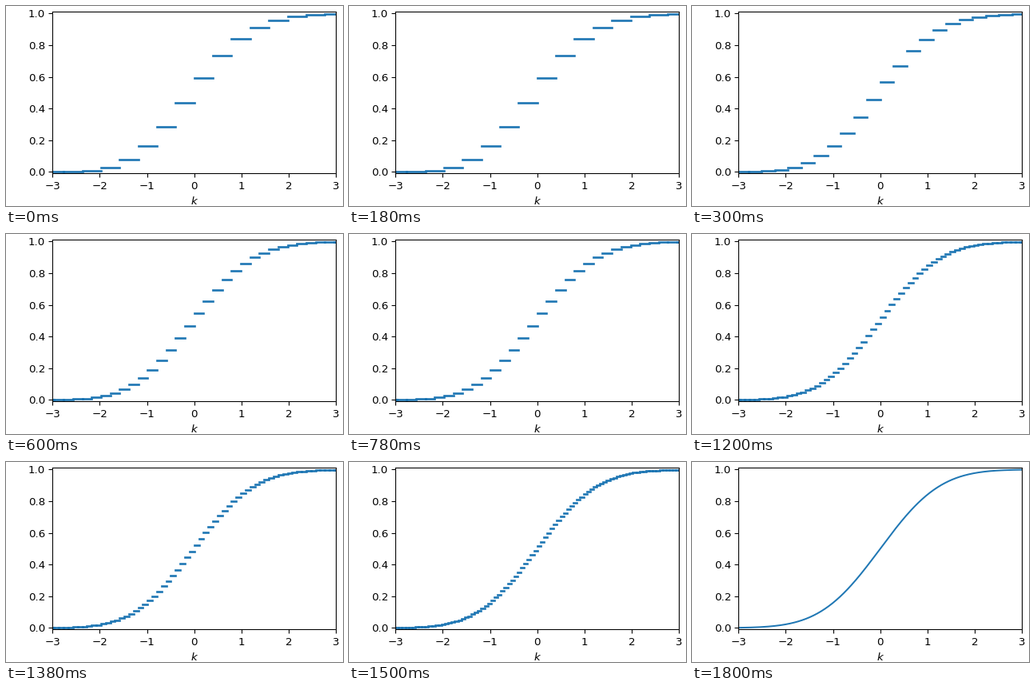
Recreate the animation shown at these times as a matplotlib script. Size 422 by 250 pixels, loop 2100 ms.

```python
import math

import numpy as np
import matplotlib.pyplot as plt
from matplotlib.animation import FuncAnimation

W, H, DPI = 422, 250, 96
LEFT, RIGHT, TOP, BOTTOM = 58.4, 413, 7.4, 209.4
P = 0.2
SIZES = [40 * 2 ** i for i in range(6)]

plt.rcParams.update({"font.family": "DejaVu Sans", "font.size": 10})


def binomial_steps(n):
    """Standardised binomial CDF as separate horizontal pieces."""
    k = np.arange(n + 1)
    log_pmf = [math.lgamma(n + 1) - math.lgamma(i + 1) - math.lgamma(n - i + 1)
               + i * math.log(P) + (n - i) * math.log(1 - P) for i in k]
    cdf = np.cumsum(np.exp(log_pmf))
    sd = math.sqrt(n * P * (1 - P))
    z = (k - n * P) / sd
    keep = np.abs(z) < 3.6
    z, cdf = z[keep], cdf[keep]
    gap = np.full_like(z, np.nan)
    x = np.column_stack([z, z + 1 / sd, gap]).ravel()
    y = np.column_stack([cdf, cdf, gap]).ravel()
    return x, y


def normal_curve():
    x = np.linspace(-3, 3, 300)
    return x, np.array([(1 + math.erf(v / math.sqrt(2))) / 2 for v in x])


fig = plt.figure(figsize=(W / DPI, H / DPI), dpi=DPI, facecolor="white")
ax = fig.add_axes([LEFT / W, 1 - BOTTOM / H, (RIGHT - LEFT) / W, (BOTTOM - TOP) / H])
ax.set(xlim=(-3, 3), ylim=(-0.01, 1.01), xlabel="$k$", xticks=range(-3, 4))
line, = ax.plot([], [], color="C0")


def draw(i):
    if i < len(SIZES):
        line.set_data(*binomial_steps(SIZES[i]))
        line.set_linewidth(2)
    else:
        line.set_data(*normal_curve())
        line.set_linewidth(1.5)
    return line,


anim = FuncAnimation(fig, draw, frames=len(SIZES) + 1, interval=300,
                     repeat=True, repeat_delay=0)
plt.show()
```
